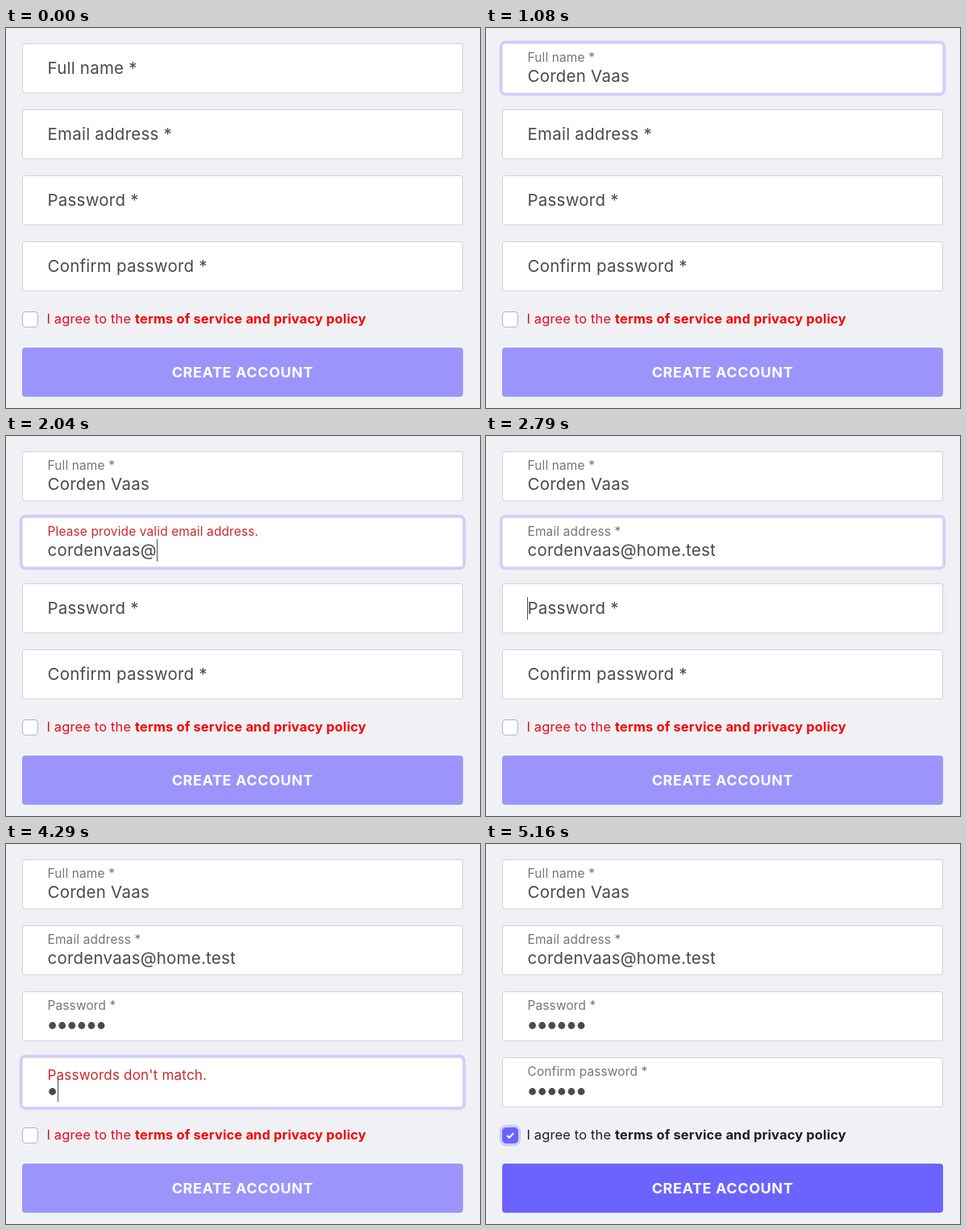
An HTML page with a canvas for the animation above (6390 ms loop, 588 by 472 pixels).

```html
<!DOCTYPE html>
<html lang="en">
<head>
<meta charset="utf-8">
<title>Sign-up form</title>
<style>
  html, body { margin: 0; width: 100%; height: 100%; overflow: hidden; background: #f0f1f5; }
  canvas { display: block; width: 588px; height: 472px; }
</style>
</head>
<body>
<canvas id="stage" width="588" height="472"></canvas>
<script>
const ctx = document.getElementById('stage').getContext('2d');
const LOOP = 6390, TICK = 30;
const LEFT = 20, WIDTH = 547, TEXT_X = 51.5;
const LARGE = 20.5, SMALL = 15.4;
const INK = '#4a4a50', CARET = '#495057', MUTED = '#75757a', ERROR = '#cb2a2a';

// Focus moves to each field in turn, then to the checkbox.
const focusMoves = [[240, 300], [1110, 1170], [2760, 2850], [3960, 4050], [5040, 5160]];
const CHECKED_AT = 5070;

const evenly = (start, gap, count) => Array.from({ length: count }, (_, i) => start + i * gap);

const fields = [
  {
    label: 'Full name *', text: 'Corden Vaas', keys: evenly(450, 60, 11), caretGap: [1080, 1200],
    error: v => v[0] && !/\S \S/.test(v[0]) && 'Please provide your full name.'
  },
  {
    label: 'Email address *', text: 'cordenvaas@home.test',
    keys: [...evenly(1350, 66.6, 10), 2040, ...evenly(2130, 60, 9)],
    error: v => v[1] && !/@\w+\.\w{2,}$/.test(v[1]) && 'Please provide valid email address.'
  },
  {
    label: 'Password *', text: '••••••', secret: true, caretGap: [3000, 3180],
    keys: [3180, 3300, 3450, 3510, 3660, 3810],
    error: v => v[2] && v[2].length < 6 && 'Password should be at least 6 characters'
  },
  {
    label: 'Confirm password *', text: '••••••', secret: true, caretGap: [4830, 5160],
    keys: evenly(4230, 90, 6),
    error: v => v[2] !== v[3] && "Passwords don't match."
  }
];

const clamp = x => Math.min(1, Math.max(0, x));
const ramp = (t, from, to) => clamp((t - from) / (to - from));
const easeOut = p => 1 - (1 - p) ** 2;
const lerp = (a, b, p) => a + (b - a) * p;
const mix = (a, b, p) => `rgb(${a.map((c, i) => Math.round(lerp(c, b[i], p)))})`;
const focusShift = (t, i) => ramp(t, ...focusMoves[i]) ** 2;

function box(x, y, w, h, radius, fill) {
  ctx.fillStyle = fill;
  ctx.beginPath();
  ctx.roundRect(x, y, w, h, radius);
  ctx.fill();
}

function setFont(size, weight = 400, spacing = size * 0.011) {
  ctx.font = `${weight} ${size}px Inter, sans-serif`;
  ctx.letterSpacing = spacing + 'px';
}

function write(text, x, y, color) {
  ctx.fillStyle = color;
  ctx.fillText(text, x, y);
}

function ring(x, y, w, h, radius, level) {
  if (level > 0) box(x - 3.2, y - 3.2, w + 6.4, h + 6.4, radius + 3.2, `rgba(108,99,255,${0.25 * level})`);
}

function drawCaret(x, y) {
  ctx.fillStyle = CARET;
  ctx.fillRect(Math.round(x), y, 1, 28);
}

function drawValue(field, value, top) {
  if (field.secret) {
    ctx.fillStyle = INK;
    for (let i = 0; i < value.length; i++) {
      ctx.beginPath();
      ctx.arc(57.6 + i * 12.1, top + 42.5, 4.4, 0, Math.PI * 2);
      ctx.fill();
    }
    return 52 + value.length * 12.1;
  }
  setFont(LARGE);
  write(value, TEXT_X, top + 48, INK);
  return TEXT_X + ctx.measureText(value).width;
}

function drawField(field, i, values, t) {
  const top = 19 + i * 82, value = values[i];
  const glow = focusShift(t, i) - focusShift(t, i + 1);
  ring(LEFT, top, WIDTH, 62, 4, glow);
  box(LEFT, top, WIDTH, 62, 4, mix([206, 212, 218], [226, 223, 255], glow));
  box(LEFT + 1, top + 1, WIDTH - 2, 60, 3, '#fff');

  const error = field.error(values);
  const lift = easeOut(ramp(t, field.keys[0], field.keys[0] + 140));
  setFont(lerp(LARGE, SMALL, lift));
  write(error || field.label, TEXT_X, top + lerp(38, 23, lift), error ? ERROR : lift > 0.5 ? MUTED : INK);

  const end = value ? drawValue(field, value, top) : 51;
  const [off, on] = field.caretGap || [0, 0];
  const focused = t >= focusMoves[i][0] && t < focusMoves[i + 1][0];
  if (focused && !(t >= off && t < on)) drawCaret(end, top + (value ? 27 : 17));
}

function drawTerms(t) {
  const checked = t >= CHECKED_AT;
  ring(20, 352, 20, 20, 5, focusShift(t, 4));
  box(20, 352, 20, 20, 5, checked ? '#6c63ff' : '#adb5bd');
  if (checked) {
    ctx.strokeStyle = '#fff';
    ctx.lineWidth = 2.2;
    ctx.beginPath();
    ctx.moveTo(26, 362);
    ctx.lineTo(28.8, 364.8);
    ctx.lineTo(34.2, 359.2);
    ctx.stroke();
  } else {
    box(21, 353, 18, 18, 4, '#fff');
  }
  setFont(16.4);
  write('I agree to the ', 50.5, 367, checked ? '#1d1d24' : '#ee0618');
  setFont(16.4, 700);
  write('terms of service and privacy policy', 160, 367, checked ? '#1d1d24' : '#f80000');
}

function drawButton(t) {
  const active = ramp(t, 5040, 5160);
  box(LEFT, 397, WIDTH, 61, 4, mix([155, 148, 251], [108, 99, 255], active));
  setFont(18, 700, 0.6);
  ctx.textAlign = 'center';
  write('CREATE ACCOUNT', 293.5, 434, '#fff');
  ctx.textAlign = 'left';
}

function draw(t) {
  ctx.fillStyle = '#f0f1f5';
  ctx.fillRect(0, 0, 588, 472);
  const values = fields.map(f => f.text.slice(0, f.keys.filter(k => k <= t).length));
  fields.forEach((field, i) => drawField(field, i, values, t));
  drawTerms(t);
  drawButton(t);
}

const start = performance.now();
function frame() {
  const t = (performance.now() - start) % LOOP;
  draw(Math.floor(t / TICK) * TICK);
  requestAnimationFrame(frame);
}
frame();
</script>
</body>
</html>
```
